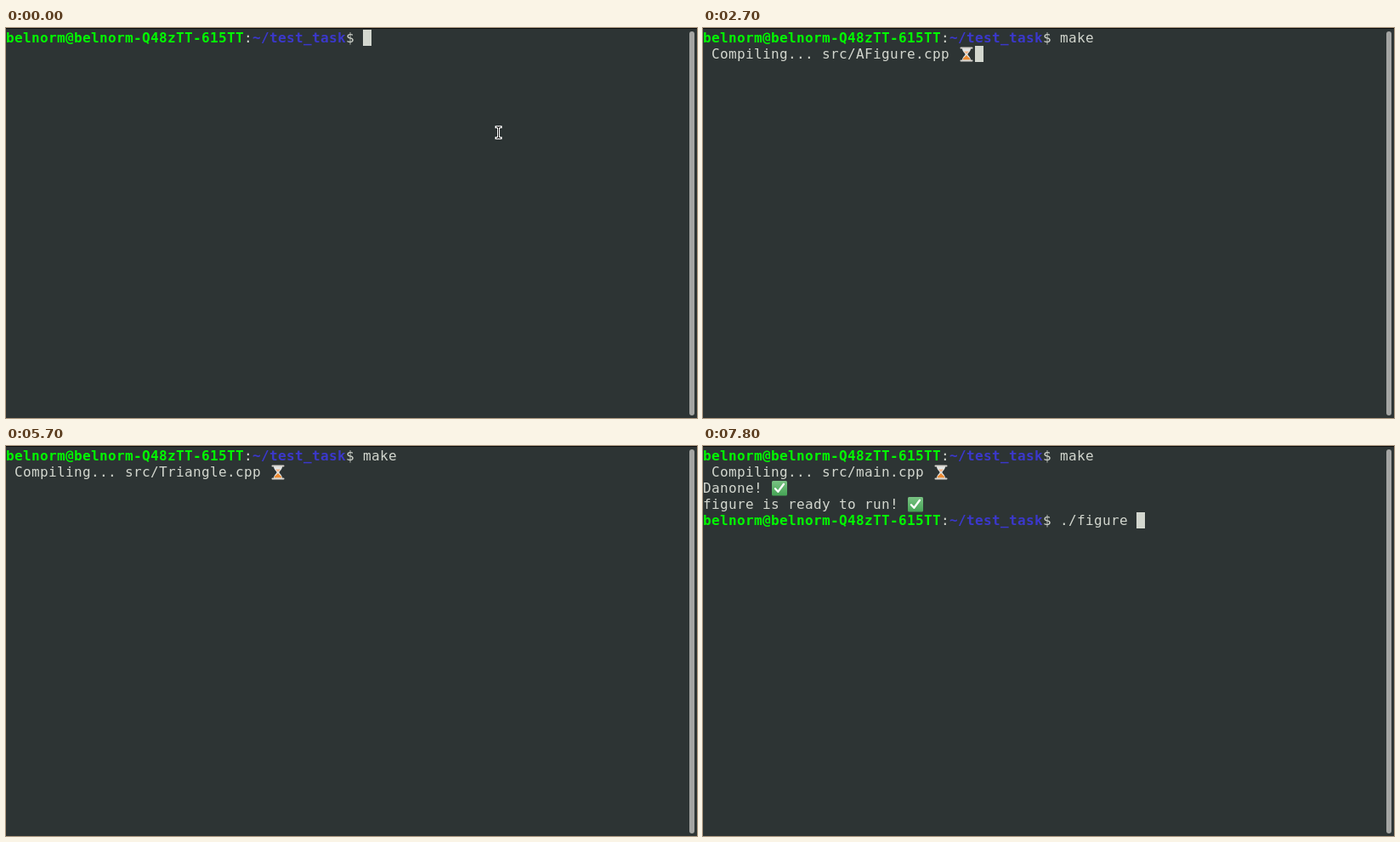
An HTML page that plays this animation: 813x459 px, repeating every 8 s.

```html
<!DOCTYPE html>
<html lang="en">
<head>
<meta charset="utf-8">
<title>Terminal</title>
<style>
  html, body { margin: 0; width: 100%; height: 100%; overflow: hidden; background: #2d3434; }
  #stage { position: relative; width: 813px; height: 459px; overflow: hidden; box-shadow: inset 0 1px #0c0e0e; }
  #screen {
    position: absolute; left: 0; top: 2px;
    font: 16px/19px "DejaVu Sans Mono", monospace;
    letter-spacing: calc(10px - 1ch); /* 10px character cells */
    font-variant-ligatures: none;
    white-space: pre; color: #d3d7cf;
  }
  #screen div { height: 19px; }
  #screen b { color: #00fa00; }
  #screen b + b, #screen .path { color: #3b38cc; }
  .cursor { display: inline-block; width: 10px; height: 19px; vertical-align: top; background: #d3d7cf; }
  .emoji { display: inline-block; width: 20px; height: 19px; vertical-align: top; }
  #bar { position: absolute; left: 804px; top: 4px; width: 6px; height: 452px; border-radius: 3px; background: #a4a5a3; }
  #pointer { position: absolute; left: 574px; top: 113px; }
</style>
</head>
<body>
<div id="stage">
  <div id="screen"></div>
  <div id="bar"></div>
  <svg id="pointer" width="11" height="20" fill="none">
    <path id="beam" d="M3 3.5H8M3 16.5H8M5.5 3.5V16.5" stroke="#fff" stroke-width="3" stroke-linecap="square"/>
    <path d="M3 3.5H8M3 16.5H8M5.5 3.5V16.5" stroke="#111" stroke-width="1"/>
  </svg>
</div>
<svg width="0" height="0" style="position:absolute">
  <defs>
    <linearGradient id="green" x2="0" y2="1">
      <stop stop-color="#79c283"/><stop offset="1" stop-color="#45a455"/>
    </linearGradient>
    <symbol id="glass" viewBox="0 0 20 19">
      <path d="M5 3H15C15 7 11.5 8.5 11.5 10S15 13 15 17H5C5 13 8.5 11.500 8.500 10S5 7 5 3Z" fill="#e4e7e6"/>
      <path d="M7 6.500H13L10 9.500Z" fill="#f2b183"/>
      <path d="M10 10.500C10.500 13 14 13 14.300 16.500H5.700C6 13 9.500 13 10 10.500Z" fill="#ee8b32"/>
      <path d="M3.500 2.500H16.500M3.500 17.500H16.500" stroke="#d5d2cc" stroke-width="2" stroke-linecap="round"/>
    </symbol>
    <symbol id="check" viewBox="0 0 20 19">
      <rect x="1" y="1" width="18" height="17.500" rx="1.500" fill="url(#green)"/>
      <path d="M5 10.200L8.300 13.800L15 4.800" fill="none" stroke="#fff" stroke-width="2.300" stroke-linecap="round" stroke-linejoin="round"/>
    </symbol>
  </defs>
</svg>
<script>
const LOOP = 8000;
const emoji = id => `<svg class="emoji"><use href="#${id}"/></svg>`;
const prompt = (command = '') =>
  `<b>belnorm@belnorm-Q48zTT-615TT</b>:<b class="path">~/test_task</b>$ ${command}`;
const compiling = name => [prompt('make'), ` Compiling... src/${name}.cpp ${emoji('glass')}`];
const built = command => [
  ...compiling('main'),
  `Danone! ${emoji('check')}`,
  `figure is ready to run! ${emoji('check')}`,
  prompt(command)
];

// [start in ms, lines, cursor lit]; the cursor follows the last line
const steps = [
  [0, [prompt()], true],
  [500, [prompt()], false],
  [1000, [prompt('m')], true],
  [1100, [prompt('ma')], true],
  [1200, [prompt('mak')], true],
  [1300, [prompt('make')], true],
  [2000, [prompt('make'), ''], true],
  [2100, [prompt('make'), ''], false],
  [2300, compiling('AFigure'), false],
  [2700, compiling('AFigure'), true],
  [3300, compiling('Circle'), false],
  [3900, compiling('Rectangle'), true],
  [4500, compiling('Rectangle'), false],
  [4600, compiling('RoundRect'), false],
  [5100, compiling('RoundRect'), true],
  [5400, compiling('Triangle'), true],
  [5700, compiling('Triangle'), false],
  [6100, compiling('main'), false],
  [6300, built(), false],
  [6400, built(), true],
  [6900, built(), false],
  [7200, built(), true],
  [7500, built('./'), true],
  [7600, built('./f'), true],
  [7800, built('./figure '), true]
];

const screenBox = document.getElementById('screen');
const pointer = document.getElementById('pointer');
const start = performance.now();
let shown;

function draw() {
  const time = Math.max(0, performance.now() - start) % LOOP;
  const step = steps.findLast(([at]) => at <= time);
  if (step !== shown) {
    shown = step;
    const [at, lines, lit] = step;
    const cursor = lit ? '<span class="cursor"></span>' : '';
    screenBox.innerHTML = `<div>${lines.join('</div><div>')}${cursor}</div>`;
    pointer.style.display = at < 1000 ? '' : 'none';
  }
  requestAnimationFrame(draw);
}
draw();
</script>
</body>
</html>
```
